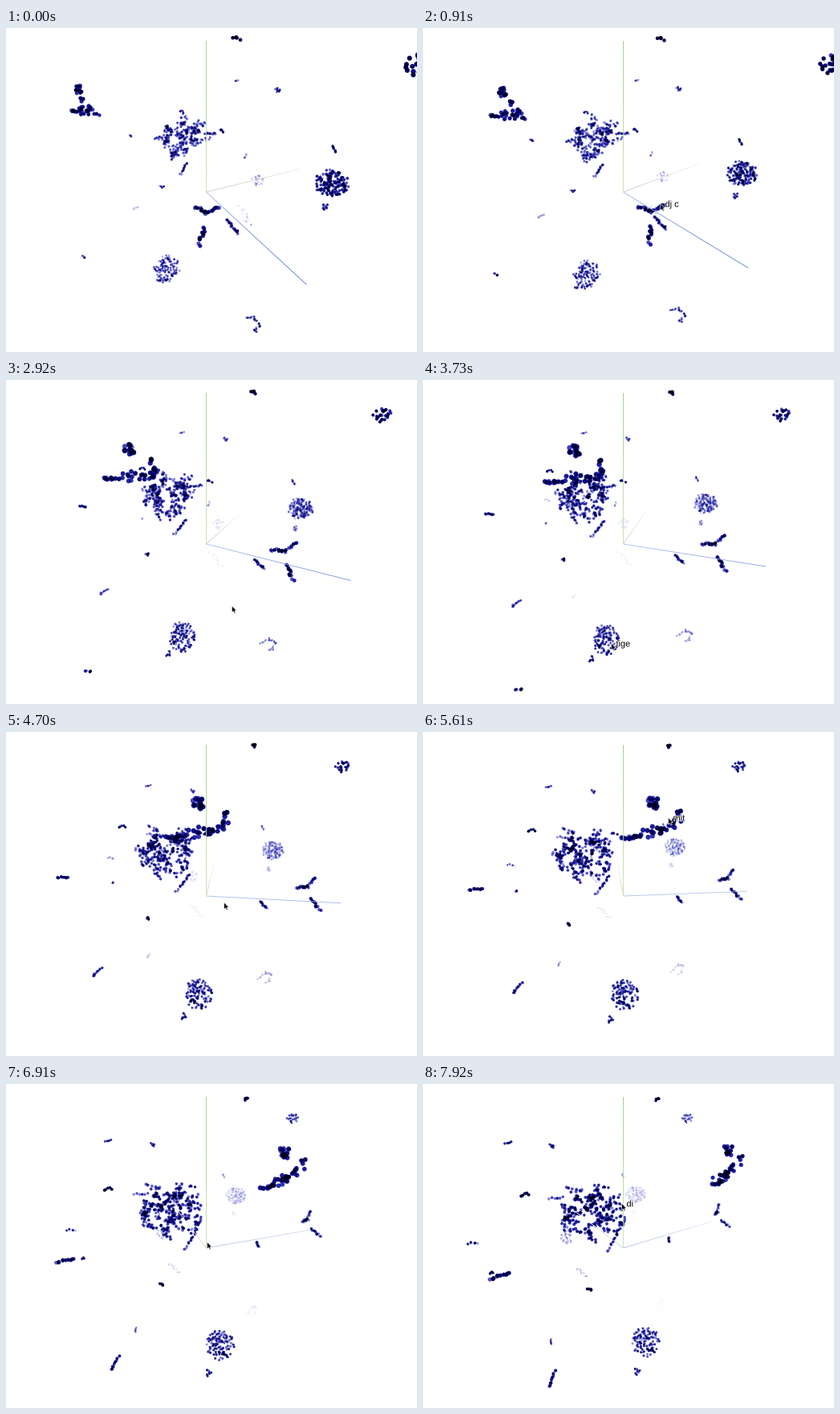
These frames come from a looping animation (512 by 403 pixels, 8 s). A matplotlib script:

```python
import numpy as np
import matplotlib.pyplot as plt
import matplotlib.patheffects as pe
from matplotlib.animation import FuncAnimation
from matplotlib.collections import LineCollection
from matplotlib.patches import Polygon

W, H, DPI = 512, 403, 64
FRAMES, INTERVAL = 80, 100
PX = 72 / DPI                       # one pixel in points

# Orbit camera: focal length, distance, elevation, axis angle and spin
CX, CY = 249.0, 203.5
FOCAL, DIST = 302, 1.89
SIN_E, COS_E = 0.476, 0.8794
START, SPIN, END = 62.7, 12.0, 7.92
FOG_NEAR, FOG_FAR = 0.9, 2.78
TINT = np.array([0.541, 0.149])     # light absorbed by one dot: red/green, blue

rng = np.random.default_rng(12)


def view(t):
    """Rows giving screen right, screen down and nearness of a world point."""
    a = np.radians(START - SPIN * t)
    c, s = np.cos(a), np.sin(a)
    return np.array([[s, 0, c],
                     [-SIN_E * c, -COS_E, SIN_E * s],
                     [-COS_E * c, SIN_E, COS_E * s]])


def project(points, t):
    right, down, near = view(t) @ np.asarray(points).T
    depth = DIST - near
    return CX + FOCAL * right / depth, CY + FOCAL * down / depth, depth


def fog(depth):
    u = np.clip((depth - FOG_NEAR) / (FOG_FAR - FOG_NEAR), 0, 1)
    return u * u * (3 - 2 * u)


def spot(x, y, x_end):
    """World point seen at (x, y) when the orbit starts and in column x_end at its end."""
    first, last = view(0), view(END)
    off = np.array([x - CX, y - CY, x_end - CX])
    axes = np.array([first[0], first[1], last[0]])
    near = np.array([first[2], first[2], last[2]])
    return np.linalg.solve(FOCAL * axes + off[:, None] * near, off * DIST)


cloud, weights = [], []


def add(points, weight):
    cloud.append(points)
    weights.append(weight * rng.uniform(0.35, 1.65, len(points)))


def directions(n):
    d = rng.normal(size=(n, 3))
    return d / np.linalg.norm(d, axis=1, keepdims=True)


def ball(center, radius, n, weight=4, squash=1.0):
    r = radius * rng.uniform(0, 1, (n, 1)) ** 0.3
    add(center + directions(n) * r * [1, squash, 1], weight)


def chain(*ends, step=0.008, jitter=0.004, weight=4):
    """Beads strung evenly along a polyline."""
    for a, b in zip(ends, ends[1:]):
        n = max(4, int(np.linalg.norm(b - a) / step))
        u = np.linspace(0, 1, n)[:, None]
        add(a + (b - a) * u + rng.normal(0, jitter, (n, 3)), weight)


def strands(center, radius, count, length, step, weight):
    """Random walks that start near the rim of a ball."""
    for d in directions(count):
        start = center + d * radius * rng.uniform(0.15, 1) ** 0.4
        add(start + np.cumsum(rng.normal(0, step, (length, 3)), axis=0), weight)


# Near cluster on the upper left that swings to the right
bend = spot(105, 103, 384)
ball(spot(89, 76, 380), 0.024, 16, 3)
chain(spot(82, 104, 364), bend, spot(93, 87, 397), jitter=0.008)
chain(bend, spot(117, 110, 361), step=0.025)

# Large loose cloud and its offshoots
strands(spot(217, 136, 209), 0.165, 40, 8, 0.014, 3.5)
chain(spot(248, 131, 207), spot(260, 131, 220))
chain(spot(237, 116, 156), spot(244, 119, 174), step=0.015)
chain(spot(225, 168, 243), spot(217, 182, 230), step=0.012)

# Round clusters
ball(spot(404, 193, 264), 0.108, 160, 4, 0.84)
ball(spot(397, 222, 262), 0.025, 9)
ball(spot(200, 299, 277), 0.112, 120, 5)
ball(spot(190, 312, 266), 0.025, 9, 6)
ball(spot(509, 45, 328), 0.048, 24, 5, 0.8)
ball(spot(313, 189, 178), 0.06, 26, 5)
ball(spot(338, 76, 159), 0.025, 9, 8)

# Long chains near the viewer, then thinner ones
chain(spot(235, 222, 363), spot(250, 229, 366), spot(264, 223, 368))
chain(spot(247, 247, 369), spot(239, 270, 382))
chain(spot(274, 237, 305), spot(289, 255, 306))
chain(spot(158, 225, 157), spot(164, 222, 165))
chain(spot(154, 133, 83), spot(156, 134, 108))
chain(spot(244, 136, 56), spot(247, 139, 66))
chain(spot(300, 360, 290), spot(310, 362, 297), spot(316, 371, 300),
      spot(308, 378, 296), step=0.014, jitter=0.008)
chain(spot(292, 222, 193), spot(305, 244, 203), step=0.015, jitter=0.012)

# Specks: short dashes lying roughly across the view
SPECKS = [(287, 13, 292), (286, 65, 105), (96, 284, 308), (408, 150, 248),
          (268, 127, 226), (218, 103, 126), (194, 197, 208), (298, 159, 176),
          (238, 250, 159), (232, 161, 84)]
for place in SPECKS:
    center = spot(*place)
    lean = rng.normal(0, 1, 3) * [1, 0.5, 1]
    half = 0.02 * lean / np.linalg.norm(lean)
    chain(center - half, center + half, weight=7)

cloud = np.vstack(cloud)
weights = np.concatenate(weights)

REACH = np.arange(-5, 6)
DX, DY = (g.ravel() for g in np.meshgrid(REACH, REACH))


def paint(t):
    """Multiply every fogged dot onto a white page."""
    x, y, depth = project(cloud, t)
    radius = np.clip(2.8 / depth, 1.0, 4.5)
    px = np.rint(x).astype(int)[:, None] + DX
    py = np.rint(y).astype(int)[:, None] + DY
    gap = np.hypot(px - x[:, None], py - y[:, None])
    cover = np.clip(radius[:, None] + 0.5 - gap, 0, 1)
    inside = (px >= 0) & (px < W) & (py >= 0) & (py < H) & (cover > 0)
    cell = (py * W + px)[inside]
    clear = 1 - fog(depth)
    layers = []
    for tint in TINT:
        solid = 1 - (1 - tint * clear) ** weights
        ink = np.log(1 - cover * solid[:, None] * 0.995)[inside]
        layers.append(np.exp(np.bincount(cell, ink, W * H)).reshape(H, W))
    return np.dstack([layers[0], layers[0], layers[1]])


fig = plt.figure(figsize=(W / DPI, H / DPI), dpi=DPI, facecolor="white")
ax = fig.add_axes([0, 0, 1, 1])
ax.axis("off")
page = ax.imshow(np.ones((H, W, 3)), extent=(-0.5, W - 0.5, H - 0.5, -0.5),
                 interpolation="nearest", aspect="auto", vmin=0, vmax=1)
ax.set_xlim(-0.5, W - 0.5)
ax.set_ylim(H - 0.5, -0.5)

AXIS_COLORS = [(0.60, 0.56, 0.46), (0.52, 0.77, 0.38), (0.33, 0.47, 0.84)]
rays = LineCollection([], linewidths=0.9 * PX, zorder=2, snap=False)
ax.add_collection(rays)

ARROW = np.array([(0, 0), (0, 8.6), (2, 6.8), (3.4, 9.6),
                  (4.8, 9), (3.5, 6.3), (6, 6.1)])
pointer = Polygon(ARROW, facecolor="black", edgecolor="white",
                  linewidth=0.6 * PX, zorder=4)
ax.add_patch(pointer)
label = ax.text(0, 0, "", fontsize=11 * PX, family="Liberation Sans",
                va="center", zorder=5,
                path_effects=[pe.withStroke(linewidth=1.5, foreground="white")])

# Pointer rests: middle time, x, y and the word shown there
RESTS = [(0.95, 295, 218, "dj c"), (2.1, 325, 236, ""), (3.73, 234, 327, "tige"),
         (5.61, 305, 106, "mit"), (6.91, 250, 196, ""), (7.92, 247, 148, "di")]
PAUSE = 0.28


def pointer_at(t):
    times = [m + side for m, *_ in RESTS for side in (-PAUSE, PAUSE)]
    return np.array([np.interp(t, times, np.repeat([r[i] for r in RESTS], 2))
                     for i in (1, 2)])


def draw_axes(t):
    segments, colors = [], []
    steps = np.linspace(0, 1, 21)
    for axis, color in zip(np.eye(3), AXIS_COLORS):
        x, y, depth = project(np.outer(steps, axis), t)
        dots = np.column_stack([x, y])
        segments += list(np.stack([dots[:-1], dots[1:]], axis=1))
        haze = fog((depth[:-1] + depth[1:]) / 2)[:, None]
        colors.append(np.array(color) * (1 - haze) + haze)
    rays.set_segments(segments)
    rays.set_color(np.vstack(colors))


def update(n):
    t = n * INTERVAL / 1000
    page.set_data(paint(t))
    draw_axes(t)
    tip = pointer_at(t)
    pointer.set_xy(ARROW + tip)
    pointer.set_visible(t >= RESTS[0][0] - PAUSE)
    label.set_text(next((r[3] for r in RESTS if abs(t - r[0]) < PAUSE), ""))
    label.set_position(tip + (6, 1))
    return page, rays, pointer, label


anim = FuncAnimation(fig, update, frames=FRAMES, interval=INTERVAL,
                     repeat=True, repeat_delay=0, blit=False)
plt.show()
```
